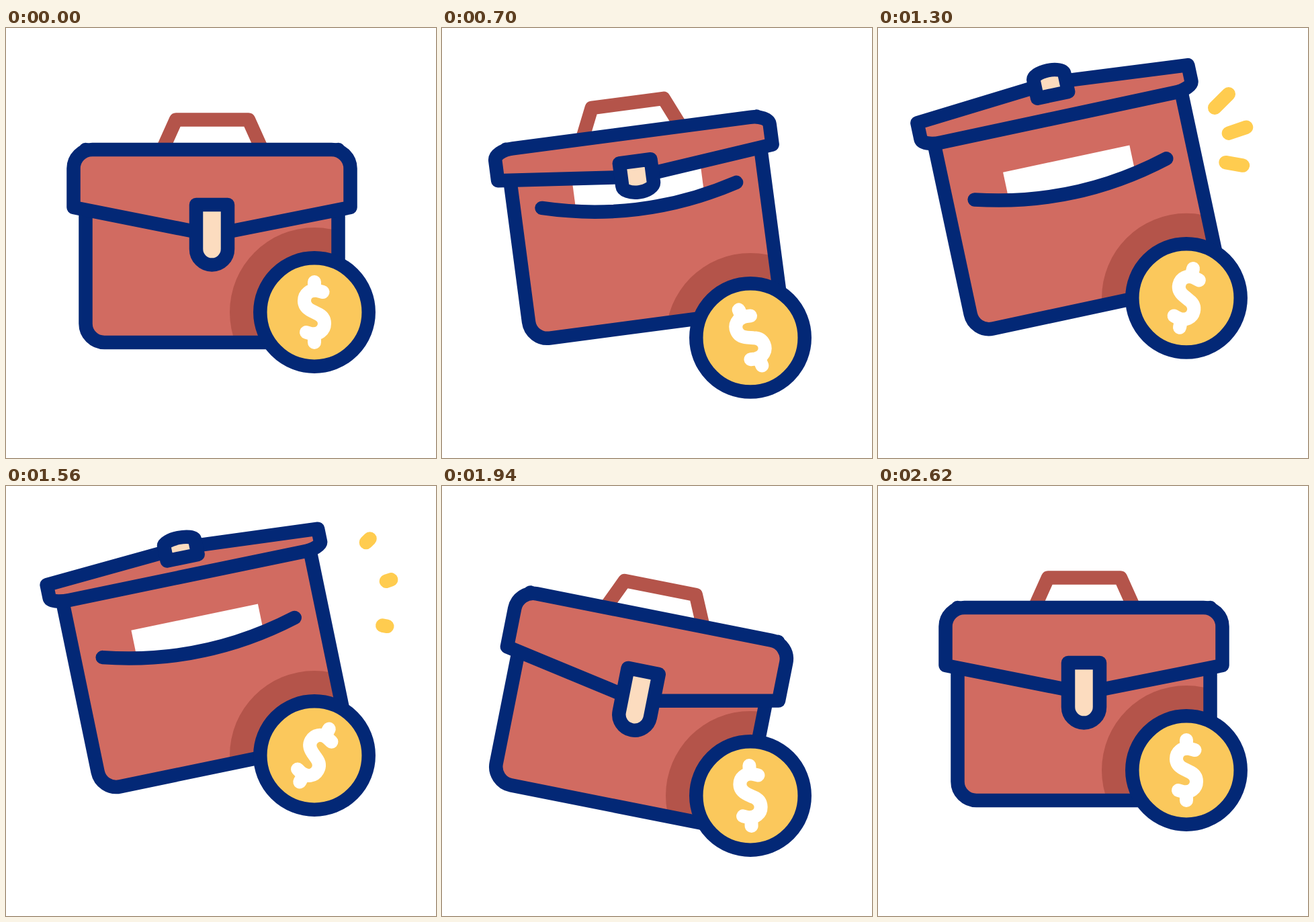
Recreate the animation shown at these times as an HTML page. Size 640 by 640 pixels, loop 3000 ms.

```html
<!DOCTYPE html>
<html lang="en">
<head>
<meta charset="utf-8">
<title>Briefcase and coin</title>
<style>
  html, body { margin: 0; width: 100%; height: 100%; overflow: hidden; background: #fff; }
  svg { display: block; width: 100vw; height: 100vh; }
  path, circle { stroke-linecap: round; stroke-linejoin: round; }
  .line { stroke: #032876; stroke-width: 20.5; }
  .red { fill: #d16b61; }
  .open { fill: none; }
  .cream { fill: #fcdcbf; }
  .dark { fill: #b4544a; }
  .handle { fill: none; stroke: #b4544a; stroke-width: 20.5; }
  .gold { fill: #fbc85c; }
  .sign { fill: none; stroke: #fff; stroke-width: 20; }
  .spark { fill: none; stroke: #ffcc4f; stroke-width: 20.5; }
</style>
</head>
<body>
<svg viewBox="0 0 640 640">
  <defs>
    <path id="shell" d="M118.5 181V440a28 28 0 0 0 28 28H466.500a28 28 0 0 0 28-28V181"/>
    <clipPath id="inside"><use href="#shell"/></clipPath>
  </defs>
  <g id="case">
    <path id="handle" class="handle"/>
    <use href="#shell" class="red"/>
    <g clip-path="url(#inside)">
      <g id="stage"><circle id="shade" class="dark" cx="459" r="126"/></g>
    </g>
    <path fill="#fff" d="M210 243.500H402.500V286Q306 304 210 286Z"/>
    <path class="line open" d="M160 274.500Q306 315.500 452 274.500"/>
    <use href="#shell" class="line open"/>
    <path id="lid" class="line red"/>
    <path id="buckle" class="line cream"/>
  </g>
  <g id="sparks"></g>
  <g id="coin">
    <circle class="line gold" r="80.7"/>
    <path id="sign" class="sign" d="M12.500-30L5-32C-7-34-15-27-15-17C-15-9-10-5-4-2L4 2C11 5 15 10 15 17C15 27 6 34-5 32L-12-30.500M0-45V-33M0 33V45"/>
  </g>
</svg>
<script>
  const LOOP = 3000;
  const HINGE = 181;
  const PIVOT = '306.5 318';
  const $ = id => document.getElementById(id);

  $('sign').setAttribute('d',
    'M12.5 -30L5 -32C-7 -34 -15 -27 -15 -17C-15 -9 -10 -5 -4 -2L4 2' +
    'C11 5 15 10 15 17C15 27 6 34 -5 32L-12 30M0 -45V-33M0 33V45');

  // Smooth curve through [time, value] pairs, flat at turning points.
  function track(...keys) {
    const slope = i => (keys[i + 1][1] - keys[i][1]) / (keys[i + 1][0] - keys[i][0]);
    const tangents = keys.map((_, i) => {
      if (i === 0 || i === keys.length - 1) return 0;
      const a = slope(i - 1), b = slope(i);
      return a * b > 0 ? 2 * a * b / (a + b) : 0;
    });
    return t => {
      if (t <= keys[0][0]) return keys[0][1];
      const i = keys.findIndex(k => k[0] > t) - 1;
      if (i < 0) return keys[keys.length - 1][1];
      const [t0, v0] = keys[i], [t1, v1] = keys[i + 1];
      const span = t1 - t0, u = (t - t0) / span, w = 1 - u;
      return v0 * w * w * (1 + 2 * u) + v1 * u * u * (3 - 2 * u)
        + span * u * w * (tangents[i] * w - tangents[i + 1] * u);
    };
  }

  const tilt = track([200, 0], [700, -7.5], [1060, -11.1], [1400, -12.2], [1560, -11.7],
    [1800, 2.5], [1940, 11.2], [2010, 13.8], [2280, 7.5], [2620, 0]);
  const shiftX = track([200, 0], [700, -7], [1060, -8], [1400, -11], [1560, -10.5],
    [1800, -15], [1940, -17.5], [2010, -20.5], [2280, -9], [2620, 0]);
  const shiftY = track([200, 0], [700, -26], [1060, -42], [1400, -52], [1560, -50],
    [1800, -10], [1940, 11.4], [2060, 15], [2280, 11], [2620, 0]);
  const flap = track([200, 1], [700, .52], [1060, 0], [1260, -.36], [1410, -.52],
    [1560, -.34], [1800, .62], [1930, 1]);
  const coinY = track([200, 423], [715, 461], [1060, 427], [1370, 399.5], [1560, 401],
    [1800, 446], [1925, 461], [2280, 442], [2620, 423]);
  const spin = track([200, 0], [700, -22.6], [840, -24], [1060, -17.2], [1490, 30],
    [1560, 28.9], [1940, -2], [2120, -8], [2280, -6.3], [2620, 0]);
  const head = track([1040, 0], [1060, .02], [1260, .48], [1560, .9], [1660, 1]);
  const tail = track([1060, 0], [1240, .1], [1560, .8], [1660, 1]);

  const sparks = [
    [491, 129, 56, -56],
    [509, 161, 71, -24],
    [505, 198, 69, 12]
  ].map(ray => {
    const el = document.createElementNS('http://www.w3.org/2000/svg', 'path');
    el.setAttribute('class', 'spark');
    $('sparks').append(el);
    return { el, ray };
  });

  function drawFlap(s) {
    const y = v => (HINGE + s * (v - HINGE)).toFixed(2);
    $('lid').setAttribute('d',
      `M100.5 ${y(267)}L100.5 ${y(209)}C100.5 ${y(193.5)} 113 ${y(181)} 128.5 ${y(181)}` +
      `L484.5 ${y(181)}C500 ${y(181)} 512.5 ${y(193.5)} 512.5 ${y(209)}` +
      `L512.5 ${y(267)}L306.5 ${y(308)}Z`);
    $('buckle').setAttribute('d',
      `M283 ${y(263)}L330 ${y(263)}L330 ${y(329)}C330 ${y(342)} 319.5 ${y(352.5)} 306.5 ${y(352.5)}` +
      `C293.5 ${y(352.5)} 283 ${y(342)} 283 ${y(329)}Z`);

    // The handle folds away behind the lid once it swings past flat.
    const up = Math.min(1, Math.max(0, 1 + s / .2));
    const top = HINGE - 44.5 * up;
    $('handle').setAttribute('d', `M233 181L253 ${top}L361 ${top}L381 181`);
  }

  function drawSparks(t) {
    const on = t >= 1040 && t < 1650;
    $('sparks').style.display = on ? '' : 'none';
    if (!on) return;
    const a = tail(t), b = head(t) + .001;
    for (const { el, ray: [x, y, dx, dy] } of sparks) {
      el.setAttribute('d', `M${x + dx * a} ${y + dy * a}L${x + dx * b} ${y + dy * b}`);
    }
  }

  function draw(t) {
    const a = tilt(t), x = shiftX(t), y = shiftY(t), cy = coinY(t);
    $('case').setAttribute('transform', `translate(${x} ${y}) rotate(${a} ${PIVOT})`);
    $('stage').setAttribute('transform', `rotate(${-a} ${PIVOT}) translate(${-x} ${-y})`);
    $('shade').setAttribute('cy', cy);
    $('coin').setAttribute('transform', `translate(459 ${cy})`);
    $('sign').setAttribute('transform', `rotate(${spin(t)})`);
    drawFlap(flap(t));
    drawSparks(t);
  }

  const start = performance.now();
  function tick() {
    draw((performance.now() - start) % LOOP);
    requestAnimationFrame(tick);
  }
  draw(0);
  requestAnimationFrame(tick);
</script>
</body>
</html>
```
